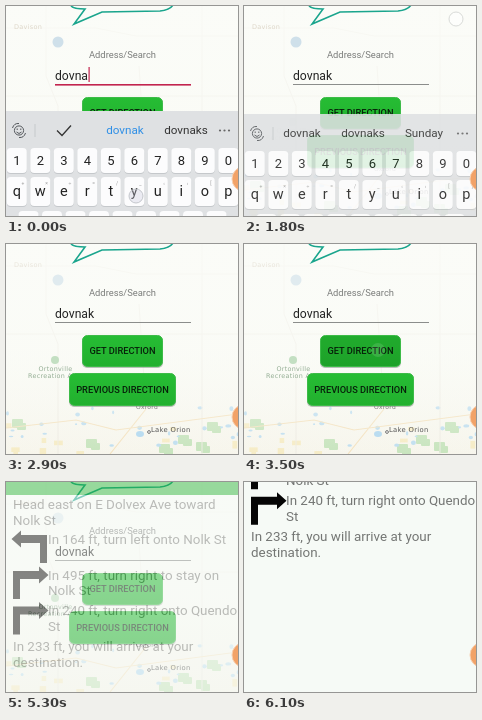
These frames come from a looping animation (232x210 px, 6.2 s). An HTML page:

```html
<!DOCTYPE html>
<html lang="en">
<head>
<meta charset="utf-8">
<title>Direction finder</title>
<style>
  html, body { margin: 0; width: 100%; height: 100%; overflow: hidden; background: #f6faf6; }
  svg { display: block; width: 232px; height: 210px; font-family: Roboto, Arial, sans-serif; }
</style>
</head>
<body>
<svg id="stage" viewBox="0 0 232 210" xmlns="http://www.w3.org/2000/svg">
  <defs>
    <linearGradient id="land" x2="0" y2="1">
      <stop offset="0" stop-color="#fafcf7"/>
      <stop offset=".5" stop-color="#f9faf4"/>
      <stop offset="1" stop-color="#f6f4ea"/>
    </linearGradient>
    <linearGradient id="veil" x2="0" y2="1">
      <stop offset="0" stop-color="#fbfcf8" stop-opacity=".85"/>
      <stop offset=".55" stop-color="#fbfcf8" stop-opacity=".6"/>
      <stop offset="1" stop-color="#fbfcf8" stop-opacity=".15"/>
    </linearGradient>
    <linearGradient id="green" x2="0" y2="1">
      <stop offset="0" stop-color="#26bd34"/>
      <stop offset="1" stop-color="#22b02e"/>
    </linearGradient>
  </defs>
  <rect width="232" height="210" fill="url(#land)"/>
  <g id="map"></g>
  <rect width="232" height="210" fill="url(#veil)"/>
  <g id="labels"></g>
  <g id="form"></g>
  <circle id="tap" cx="212" cy="13" r="7" fill="#fff" fill-opacity=".5" stroke="#d9dbd8"/>
  <g id="keyboard"></g>
  <g id="page"></g>
  <circle cx="238.5" cy="173" r="12.5" fill="#f2a267" stroke="#f8d0b0"/>
</svg>
<script>
const LOOP = 6200, STEP = 100;
const WORD = 'dovnak';
const $ = id => document.getElementById(id);
const ramp = (t, from, to) => Math.min(1, Math.max(0, (t - from) / (to - from)));

const text = (x, y, str, size, fill, extra = '') =>
  `<text x="${x}" y="${y}" font-size="${size}" fill="${fill}" ${extra}>${str}</text>`;
const centered = (x, y, str, size, fill, extra = '') =>
  text(x, y, str, size, fill, `text-anchor="middle" ${extra}`);
const rect = (x, y, w, h, fill, r = 0, extra = '') =>
  `<rect x="${x}" y="${y}" width="${w}" height="${h}" rx="${r}" fill="${fill}" ${extra}/>`;
const line = (d, stroke, width = 1) =>
  `<path d="${d}" fill="none" stroke="${stroke}" stroke-width="${width}"/>`;

function seeded(seed) {
  return () => (seed = (seed * 16807) % 2147483647) / 2147483647;
}

function drawMap() {
  const rand = seeded(77);
  const parks = [[6, 175], [80, 195], [153, 200], [172, 191], [190, 198], [201, 178]];
  let out = parks.map(([x, y]) =>
    rect(x, y, 11, 9, '#bfe0b4', 1) + rect(x + 5, y + 4, 9, 7, '#bfe0b4', 1)).join('');
  for (let i = 0; i < 10; i++) {
    out += rect(rand() * 230, 175 + rand() * 33, 4 + rand() * 7, 3 + rand() * 6, '#f5e9bd');
  }
  for (let i = 0; i < 24; i++) {
    const x = rand() * 232, y = 163 + rand() * 45;
    out += `<ellipse cx="${x}" cy="${y}" rx="${1 + rand() * 2}" ry="${0.8 + rand() * 1.5}" fill="#b5d9ee"/>`;
  }
  out += '<ellipse cx="134" cy="190" rx="4" ry="3" fill="#a5d2ee"/>';
  return out +
    line('M0 22H90L130 30H232M40 0V70L52 100V210M0 90H232M133 60L140 165M196 0V210', '#ebe8df') +
    line('M0 184L70 176L110 186L232 170M140 165L104 210', '#f3dfb8', 1.2);
}

const mapLabel = 'letter-spacing=".3" font-family="DejaVu Sans, sans-serif"';

function drawForm() {
  const button = (x, y, w, h, label, id) =>
    rect(x, y + 1, w, h, '#78877a', 5, 'opacity=".5"') +
    rect(x + .5, y + .5, w - 1, h - 1, 'url(#green)', 5, 'stroke="#3dbb48"') +
    rect(x + 1, y + 1, w - 2, h - 2, '#064a0c', 4, `id="${id}" opacity="0"`) +
    centered(x + w / 2, y + h / 2 + 3.3, label, 9.25, '#07200a', 'font-weight="500"');
  return line('M65 0Q68 3 79 3L68 18L96 6L154 5Q164 4 167 -1', '#1aa58d', 1.6) +
    centered(116.5, 51.5, 'Address/Search', 9.4, '#7b7d7b') +
    text(49, 73.5, '', 12.2, '#222', 'id="entry"') +
    rect(84.5, 61, 1.2, 15, '#c2244f', 0, 'id="caret"') +
    rect(49, 78, 136, 1, '#888', 0, 'id="rule"') +
    button(76, 91, 81, 32, 'GET DIRECTION', 'press') +
    '<circle id="ripple" cx="134" cy="106" r="7" fill="#fff"/>' +
    button(63, 129, 107, 33, 'PREVIOUS DIRECTION', 'idle');
}

function drawKeyboard() {
  const pitch = 23.5;
  const key = (x, y, h) =>
    rect(x, y + 1, 20, h, '#c5c8cb', 4) + rect(x, y, 20, h, '#fcfcfd', 4);
  const row = (chars, y, h, size) => [...chars].map((c, i) => {
    const cx = 10.8 + i * pitch;
    return key(cx - 10, y, h) + centered(cx, y + h / 2 + 4.2, c, size, '#222');
  }).join('');
  let out = rect(0, 105, 232, 125, '#dfe1e3') +
    row('1234567890', 142, 25, 13) + row('qwertyuiop', 171, 29, 14.5);
  [...'+×÷=/_‹›[]'].forEach((mark, i) => out += centered(17 + i * pitch, 179, mark, 5, '#999'));
  for (let i = 0; i < 9; i++) out += key(12.5 + i * pitch, 205, 25);
  out += '<circle id="touch" cx="130" cy="190" r="7" fill="#ccd" fill-opacity=".35" stroke="#c4c7cc"/>';

  const ink = '#54585c';
  out += `<circle cx="13" cy="124.5" r="4.6" fill="none" stroke="${ink}"/>` +
    line('M6.5 122Q8 117 13 117.5M19.5 127Q18 132 13 131.5', ink) +
    line('M10.5 126Q13 129 15.5 126M11.2 122.5V124M14.8 122.5V124', ink) +
    rect(28.5, 118, 1, 13, '#c6c9cc');
  for (const x of [214, 218.5, 223]) out += `<circle cx="${x}" cy="124.5" r="1.1" fill="#666"/>`;

  const word = (x, str, fill) => centered(x, 128.3, str, 11.7, fill);
  return out +
    `<g id="typing">${line('M51 124.5L56 129.5L65 119.5', '#333', 1.3)}` +
    `${word(119, WORD, '#2f8fe6')}${word(180, WORD + 's', '#333')}</g>` +
    `<g id="typed">${word(58, WORD, '#333')}${word(119, WORD + 's', '#333')}${word(180, 'Sunday', '#333')}</g>`;
}

function drawPage() {
  const say = (x, y, str) => text(x, y, str, 13.4, '#747674');
  const turn = (y, flip) =>
    `<path transform="translate(${flip ? 48 : 0} ${y})${flip ? ' scale(-1 1)' : ''}"
      d="M7 28V0H33V-4.5L42.5 4L33 12.5V8H14V28Z" fill="#050505"/>`;
  return rect(0, -20, 232, 400, '#f6faf6') + rect(0, -20, 232, 33, '#2cb43a') +
    say(7, 27, 'Head east on E Dolvex Ave toward') + say(7, 43, 'Nolk St') +
    turn(53, true) + say(42, 62, 'In 164 ft, turn left onto Nolk St') +
    turn(89) + say(42, 97.5, 'In 495 ft, turn right to stay on') + say(42, 113, 'Nolk St') +
    turn(124.5) + say(42, 133, 'In 240 ft, turn right onto Quendol') + say(42, 149, 'St') +
    say(7, 168.5, 'In 233 ft, you will arrive at your') + say(7, 184.5, 'destination.');
}

$('map').innerHTML = drawMap();
$('labels').innerHTML =
  `<g id="early">${text(8, 23, 'Davison', 6.5, '#ddd6c8', mapLabel)}` +
  '<circle cx="52" cy="36" r="5.5" fill="#cfe0ea"/></g>' +
  `<g id="park"><circle cx="49" cy="116" r="4" fill="#c3dfc2"/>` +
  `${centered(49.5, 126.5, 'Ortonville', 6.4, '#93ad93', mapLabel)}` +
  `${text(22, 134.3, 'Recreation A', 6.4, '#93ad93', mapLabel)}</g>` +
  `<circle cx="143" cy="188" r="1.4" fill="#fff" stroke="#555" stroke-width=".8"/>` +
  text(145, 187.5, 'Lake Orion', 6.8, '#555', mapLabel) +
  text(130, 164.5, 'Oxford', 6, '#777', mapLabel);
$('form').innerHTML = drawForm();
$('keyboard').innerHTML = drawKeyboard();
$('page').innerHTML = drawPage();

const opacity = (id, value) => $(id).setAttribute('opacity', value);
const shift = (id, y) => $(id).setAttribute('transform', `translate(0 ${y})`);

function render(t) {
  $('entry').textContent = t >= 100 ? WORD : WORD.slice(0, -1);
  $('caret').setAttribute('x', 49.5 + $('entry').getComputedTextLength());
  opacity('caret', 1 - ramp(t, 1100, 1300));

  const focused = t < 1200;
  $('rule').setAttribute('fill', focused ? '#c2244f' : '#8b8d8b');
  $('rule').setAttribute('height', focused ? 1.6 : 1);

  opacity('touch', 1 - ramp(t, 0, 700));
  opacity('tap', ramp(t, 1100, 1300) * (1 - ramp(t, 1800, 2200)));
  const swap = ramp(t, 700, 1000);
  opacity('typing', 1 - swap);
  opacity('typed', swap);

  const hide = Math.max(0, (t - 1600) / 200);
  shift('keyboard', 3 * hide * hide);
  opacity('keyboard', t < 1600 ? 1 : t <= 1800 ? 1 - .12 * hide : .88 * (1 - ramp(t, 1800, 2200)));

  opacity('early', 1 - .4 * ramp(t, 1800, 2200));
  opacity('park', .5 * ramp(t, 1600, 2200) + .5 * ramp(t, 2200, 2900));
  const pressed = ramp(t, 2900, 3400) * (1 - ramp(t, 4400, 5100));
  opacity('press', .15 * pressed);
  opacity('ripple', .12 * pressed);

  const since = (t - 5300) / 1000;
  opacity('page', since < 0 ? 0 : Math.min(1, .48 + since * 2.6));
  shift('page', since < 0 ? 0 : -114 * (1 - Math.exp(-4.08 * since)));
}

const start = performance.now();
function tick() {
  const t = (performance.now() - start) % LOOP;
  render(Math.floor(t / STEP) * STEP);
  requestAnimationFrame(tick);
}
tick();
</script>
</body>
</html>
```
